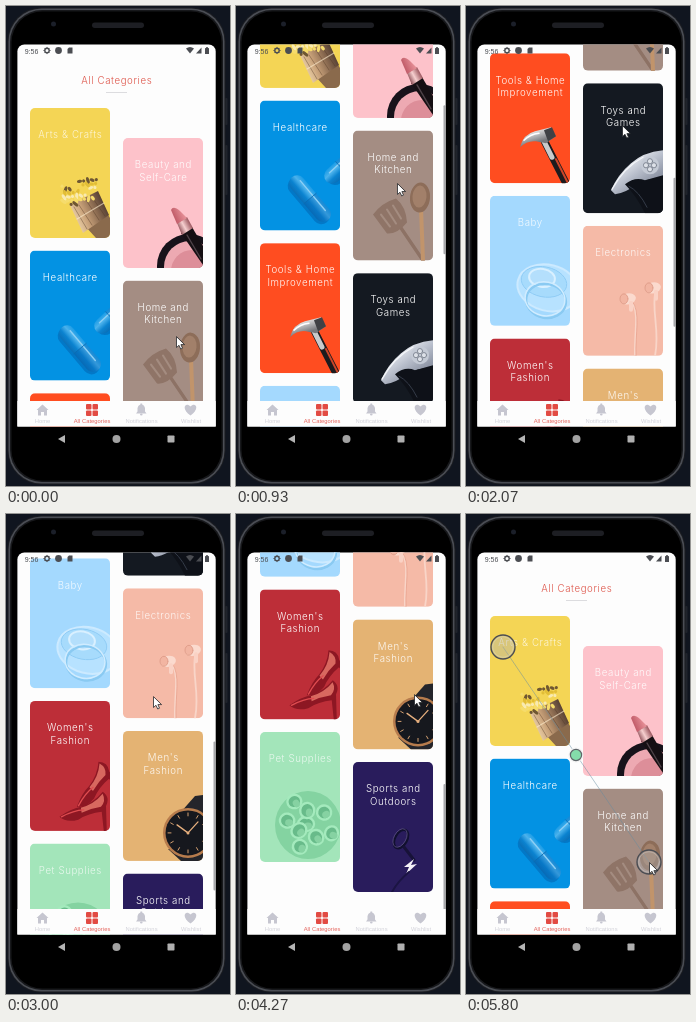
Recreate the animation shown at these times as an HTML page with a canvas. Size 224x480 px, loop 5870 ms.

```html
<!DOCTYPE html>
<html lang="en">
<head>
<meta charset="utf-8">
<title>Categories</title>
<style>
html, body { margin: 0; width: 100%; height: 100%; overflow: hidden; background: #10151d; }
canvas { display: block; width: 224px; height: 480px; }
</style>
</head>
<body>
<canvas id="stage"></canvas>
<script>
const W = 224, H = 480, LOOP = 5870, STEP = 200 / 3;
const PLAIN = '"Liberation Sans", Arial, sans-serif';
const LIGHT = 'Inter, "Liberation Sans", sans-serif';
const canvas = document.getElementById('stage');
const ctx = canvas.getContext('2d');
const dpr = window.devicePixelRatio || 1;
canvas.width = W * dpr;
canvas.height = H * dpr;

// Time, value
const scrollKeys = [
  [0, 0], [200, 0], [933, 150], [1100, 180], [1450, 192], [2067, 340], [2200, 360],
  [2500, 372], [3000, 485.5], [3150, 512], [3450, 532], [3750, 588], [3930, 597],
  [4267, 597], [4667, 339], [5000, 90], [5270, 0], [LOOP, 0]
];
// Time, x, y
const pointerKeys = [
  [0, 171, 331], [200, 171, 329], [933, 162, 178], [1090, 161, 150], [1480, 163, 275],
  [2067, 157, 120], [2480, 155, 300], [3000, 148, 183], [3150, 149, 155], [3470, 160, 235],
  [3850, 172, 160], [4267, 179, 181], [4667, 177, 266], [5270, 184, 349], [LOOP, 184, 349]
];

// Smooth interpolation that never overshoots a key
function sample(keys, t, col) {
  let i = 0;
  while (i < keys.length - 2 && t >= keys[i + 1][0]) i++;
  const slope = k => k < 0 || k > keys.length - 2 ? 0 :
    (keys[k + 1][col] - keys[k][col]) / (keys[k + 1][0] - keys[k][0]);
  const tangent = k => {
    const a = slope(k - 1), b = slope(k);
    return a * b > 0 ? 2 * a * b / (a + b) : 0;
  };
  const a = keys[i], b = keys[i + 1], d = b[0] - a[0];
  const u = Math.min(1, (t - a[0]) / d), v = 1 - u;
  return a[col] * (1 + 2 * u) * v * v + b[col] * u * u * (3 - 2 * u) +
    d * (tangent(i) * u * v * v - tangent(i + 1) * u * u * v);
}

function fill(d, color) {
  ctx.fillStyle = color;
  ctx.fill(new Path2D(d));
}

function line(d, color, width = 1) {
  ctx.strokeStyle = color;
  ctx.lineWidth = width;
  ctx.lineCap = 'round';
  ctx.stroke(new Path2D(d));
}

function oval(x, y, rx, ry, color, edge, width = 1, turn = 0) {
  ctx.beginPath();
  ctx.ellipse(x, y, rx, ry, turn, 0, Math.PI * 2);
  if (color) { ctx.fillStyle = color; ctx.fill(); }
  if (edge) { ctx.strokeStyle = edge; ctx.lineWidth = width; ctx.stroke(); }
}

function box(x, y, w, h, r, color) {
  ctx.beginPath();
  ctx.roundRect(x, y, w, h, r);
  ctx.fillStyle = color;
  ctx.fill();
}

function blend(x1, y1, x2, y2, ...colors) {
  const g = ctx.createLinearGradient(x1, y1, x2, y2);
  colors.forEach((c, i) => g.addColorStop(i / (colors.length - 1), c));
  return g;
}

function label(text, x, y, font, size, color, gap = 0) {
  ctx.font = font;
  ctx.letterSpacing = gap + 'px';
  ctx.textAlign = 'center';
  ctx.textBaseline = 'alphabetic';
  ctx.fillStyle = color;
  ctx.fillText(text, x + gap / 2, y + size * 0.36);
}

const heading = (text, x, y, color) => label(text, x, y, `300 9.7px ${LIGHT}`, 9.7, color, 0.6);
const caption = (text, x, y, size, color) => label(text, x, y, `${size}px ${PLAIN}`, size, color, 0.04);

function capsule(x, y, length, turn) {
  const half = length / 2;
  ctx.save();
  ctx.translate(x, y);
  ctx.rotate(turn);
  box(-half + 1, -6, length, 17, 8.5, 'rgba(0,90,165,.45)');
  box(-half, -8, length, 16, 8, blend(0, -8, 0, 8, '#1b9ce6', '#4bb2ec', '#0b83d0', '#0a70b8'));
  box(0, -8, half, 16, [0, 8, 8, 0], 'rgba(0,95,175,.3)');
  line(`M${8 - half} -4H${half - 9}`, '#8dcff5', 1.4);
  line('M0 -8V8', '#0b6cb2', 0.8);
  ctx.restore();
}

function brush() {
  fill('M55 118L77 105L80 110V130H66Z', '#8a6a4c');
  fill('M40 97L68 83L79 107L53 125Z', blend(42, 110, 76, 94, '#efd6ad', '#c9a27a', '#8a6a50', '#4b372d'));
  line('M44 99L57 121M49 97L62 117M56 92L69 112M62 89L75 108', 'rgba(80,55,38,.45)', 0.9);
  line('M47 111L74 95', 'rgba(255,238,208,.6)', 1.2);
  for (let i = 0; i < 34; i++) {
    const x = 32 + (i * 7.7) % 35, y = 74 + (i * 5.3) % 22 - (x - 46) * 0.3;
    oval(x, y, 1.6 + i % 3, 1.6, ['#f6dc6c', '#6f5732', '#e2bd36', '#f9eab0'][i % 4], null, 1, i);
  }
}

function lipstick() {
  oval(66, 128, 32, 32, '#17121a');
  oval(67, 129, 26, 26, '#eda9b2');
  oval(69, 133, 21, 21, '#dd8e99');
  fill('M58 95L69 89L80 108V127Z', '#150f13');
  fill('M54 85L64 79L70 90L59 97Z', blend(56, 92, 67, 86, '#8b4d55', '#f6cfcf', '#a4636a'));
  fill('M48 72Q50 67 57 73L64 80L54 86Z', blend(49, 80, 60, 75, '#b9515f', '#e48d95'));
  line('M64 97L78 121', '#4d4147', 1.4);
}

function utensils() {
  line('M47 96L70 130', '#8d7265', 3.4);
  fill('M20 84Q29 72 43 68Q53 76 54 92Q44 104 34 103Z', '#8f7467');
  line('M28 84L37 96M34 79L43 93M40 75L48 88', '#a48c80', 2);
  line('M68 78L70 130', '#c1946b', 4);
  oval(67, 67, 10, 15, '#8d6d59', null, 1, 0.08);
  oval(66.5, 66, 7, 11, '#a2806a', null, 1, 0.08);
}

function hammer() {
  ctx.lineCap = 'butt';
  line('M55 89L76 130', '#1d1b1e', 7.5);
  line('M54 88L62 104', '#c9cacb', 5);
  line('M66 106L78 130', '#ce4528', 2);
  fill('M30 94Q33 81 45 78L61 74L66 83L56 90L46 88Q37 87 30 94Z', blend(40, 77, 44, 90, '#f6f3f1', '#b6b7b9', '#77797d'));
  fill('M54 77L62 74L66 83L58 88Z', '#3f4145');
  line('M34 87Q40 81 49 80', '#fff', 1.5);
}

function gamepad() {
  fill('M28 107Q35 91 48 80Q60 69 80 67V95Q66 94 54 101Q42 110 32 111Z', blend(40, 80, 58, 105, '#e6e9ef', '#b9bfcc', '#8f96a6'));
  fill('M42 101Q52 93 62 97L80 92V130H62Q53 112 42 101Z', '#0e1118');
  line('M29 106Q41 84 60 74', '#f4f6f9', 1.3);
  line('M46 103Q56 108 64 124', '#343b48', 1);
  oval(67, 82, 9, 9, '#c4cad5');
  for (const [x, y] of [[63, 82], [71, 82], [67, 78], [67, 86]]) oval(x, y, 2.6, 2.6, '#dde1e8', '#6f7684', 0.8);
}

function pacifier() {
  oval(58, 92, 31, 23, 'rgba(210,238,255,.4)', '#cceaff', 2, 0.25);
  oval(54, 86, 23, 15, 'rgba(120,193,241,.25)', '#8fccf5', 1, 0.2);
  oval(52, 82, 13, 9, '#b4dffc', '#d9f0ff', 2, 0.15);
  oval(56, 105, 20, 17, null, '#8acaf2', 2.4, 0.2);
  oval(55, 103, 20, 17, null, '#d0ecff', 1.5, 0.2);
}

function earbuds() {
  line('M48 75C57 86 51 108 52 130M72 68C69 88 77 106 72 130', '#f9d5c8', 1.8);
  line('M49 75C58 86 52 108 53 130', '#e29881', 0.6);
  for (const [x, y] of [[45, 73], [70, 62]]) {
    oval(x, y, 8, 5.5, '#fbdace', null, 1, -0.2);
    oval(x - 4, y, 4, 5, '#f2b5a2', '#d99480', 0.7);
    box(x + 1, y + 2, 4, 11, 2, '#fad2c5');
  }
}

function shoe(x, y, turn) {
  ctx.save();
  ctx.translate(x, y);
  ctx.rotate(turn);
  fill('M-24 12Q-12 3 -3 1Q10-4 18-15Q26-10 22-1L24 24L21 24L18 5Q5 7-5 14Q-17 18-24 12Z', '#8d1723');
  fill('M-3 2Q10-2 18-13Q22-6 17 0Q7 2-2 7Z', '#d8685f');
  line('M-22 12Q-10 5 0 4', '#df4c50', 1.4);
  ctx.restore();
}

function heels() {
  shoe(61, 83, -0.55);
  shoe(54, 105, 0.05);
}

function watch() {
  fill('M57 82L72 65L80 64V96Z', '#24252b');
  fill('M45 118L58 130H80V116Z', '#24252b');
  oval(65, 102, 25, 25, '#b77c4d');
  oval(65, 102, 22.5, 22.5, '#16181e');
  for (let i = 0; i < 12; i++) {
    const c = Math.cos(i * Math.PI / 6), s = Math.sin(i * Math.PI / 6);
    line(`M${65 + c * 17} ${102 + s * 17}L${65 + c * 20} ${102 + s * 20}`, '#d4a071', 1);
  }
  line('M65 102L54 94M65 102L75 91', '#e5ae7d', 1.3);
  oval(65, 102, 1.5, 1.5, '#e5ae7d');
}

function ball() {
  oval(48, 93, 33, 34, '#84d3a1');
  for (let i = 0; i < 9; i++) {
    const a = i * 2.4, r = Math.sqrt(i) * 9.6;
    const x = 46 + Math.cos(a) * r, y = 92 + Math.sin(a) * r;
    oval(x, y, 8 - i * 0.2, 7, '#68bb8a', '#a4eabd', 2.4, a);
    oval(x + 2, y + 2, 4, 3.4, '#86d2a2', null, 1, a);
  }
}

function sport() {
  oval(48, 77, 6, 10, null, '#11102f', 2.5, 0.5);
  oval(47, 76, 6, 10, null, '#66598d', 0.7, 0.5);
  line('M51 85L61 98', '#171238', 3);
  fill('M61 97L51 105L56 105L53 112L64 102L58 103Z', '#f4f1f7');
  line('M56 110Q45 119 39 130', '#1b1443', 2);
}

function capsules() {
  capsule(81, 67, 40, -0.75);
  capsule(50, 98, 56, 0.87);
}

const columns = [
  { x: 24, y: 102, cards: [
    ['#f4d555', 'Arts & Crafts', brush, 0.75],
    ['#0392e3', 'Healthcare', capsules, 1],
    ['#ff4d20', 'Tools & Home|Improvement', hammer, 0.95],
    ['#a4d9fe', 'Baby', pacifier, 0.85],
    ['#bd2e38', "Women's|Fashion", heels, 1],
    ['#a3e5ba', 'Pet Supplies', ball, 0.75]
  ] },
  { x: 117, y: 132, cards: [
    ['#fdc2ca', 'Beauty and|Self-Care', lipstick, 0.9],
    ['#a48d83', 'Home and|Kitchen', utensils, 1],
    ['#141921', 'Toys and|Games', gamepad, 1],
    ['#f5baa7', 'Electronics', earbuds, 0.85],
    ['#e4b373', "Men's|Fashion", watch, 0.9],
    ['#291c5c', 'Sports and|Outdoors', sport, 1]
  ] }
];

function drawCard(x, y, [color, text, art, alpha]) {
  ctx.save();
  ctx.translate(x, y);
  ctx.beginPath();
  ctx.roundRect(0, 0, 80, 130, 5);
  ctx.clip();
  ctx.fillStyle = color;
  ctx.fillRect(0, 0, 80, 130);
  art();
  text.split('|').forEach((s, i) => heading(s, 40, 26.8 + i * 12.5, `rgba(255,255,255,${alpha})`));
  ctx.restore();
}

function drawPhone() {
  ctx.fillStyle = '#10151f';
  ctx.fillRect(0, 0, W, H);
  box(219, 92, 2.5, 27, 1, '#20242c');
  box(219, 139, 2.5, 50, 1, '#20242c');
  box(1.5, 1.5, 218, 477, 34, '#1a1c21');
  box(2.5, 2.5, 216, 475, 33, '#4a4d54');
  box(4, 4, 213, 472, 32, '#17181b');
  box(5.5, 5.5, 210, 469, 31, '#000');
  box(86, 16.5, 52, 5.5, 2.8, '#1d1e23');
  oval(47.5, 18, 2.5, 2.5, '#1b1f29');
  fill('M59 429V437L52 433Z', '#b4b4b4');
  oval(110.5, 433, 4, 4, '#a2a2a2');
  box(161.5, 429.5, 7, 7, 0.8, '#b0b0b0');
}

function drawStatus() {
  const ink = '#4b4d52';
  caption('9:56', 25.5, 45, 7, ink);
  oval(41, 44.5, 2.2, 2.2, null, ink, 1.4);
  for (let i = 0; i < 8; i++) {
    const c = Math.cos(i * Math.PI / 4), s = Math.sin(i * Math.PI / 4);
    line(`M${41 + c * 2.6} ${44.5 + s * 2.6}L${41 + c * 3.2} ${44.5 + s * 3.2}`, ink, 0.9);
  }
  oval(52.5, 44.5, 3.4, 3.4, ink);
  fill('M63 41.500H66.500V47.500H61.500V43Z', ink);
  fill('M180 42.500Q184 39.500 188 42.500L184 47.500Z', ink);
  fill('M190 47.500L195.500 41.500V47.500Z', ink);
  box(199, 42, 4, 6, 0.6, ink);
  box(200.2, 41, 1.6, 1, 0, ink);
}

function drawTabs() {
  const grey = '#c6c6d0', red = '#e24b43';
  ctx.fillStyle = '#fdfdfd';
  ctx.fillRect(11, 395, 199, 26);
  fill('M30.500 404L36.500 398.500L42.500 404H41V409.500H38V406H35V409.500H32V404Z', grey);
  for (const x of [80, 86.5]) for (const y of [398, 404.5]) box(x, y, 5.5, 5.5, 1, red);
  fill('M130 407.500L131.500 405.500V402Q132 399 134.400 398.500V397.500H136.200V398.500Q138.500 399 139 402V405.500L140.500 407.500Z', grey);
  oval(135.3, 408.5, 1.3, 1, grey);
  fill('M184.500 409.500C174 402 180 395.500 184.500 400.500C189 395.500 195 402 184.500 409.500Z', grey);
  const tabs = [['Home', 36.5], ['All Categories', 86], ['Notifications', 135.5], ['Wishlist', 185]];
  for (const [s, x] of tabs) caption(s, x, 415, 5.8, x === 86 ? '#e5645d' : '#d2d2da');
}

function drawScreen(t) {
  const scroll = sample(scrollKeys, t, 1);
  ctx.save();
  ctx.beginPath();
  ctx.roundRect(11.4, 38.4, 198.3, 382.2, [7, 7, 0, 0]);
  ctx.clip();
  ctx.fillStyle = '#fdfdfd';
  ctx.fillRect(11, 38, 199, 383);
  heading('All Categories', 110.5, 75 - scroll, '#de564b');
  ctx.fillStyle = '#dcdcdf';
  ctx.fillRect(100, 86 - scroll, 21, 1);
  for (const { x, y, cards } of columns) {
    cards.forEach((card, i) => {
      const top = y + i * 142.6 - scroll;
      if (top > -100 && top < 396) drawCard(x, top, card);
    });
  }
  const fadeIn = Math.min(1, Math.max(0, (t - 200) / 100));
  const fadeOut = Math.min(1, Math.max(0, (5480 - t) / 200));
  const shown = fadeIn * fadeOut;
  if (shown) box(207.5, 42 + scroll * 0.382, 2, 149, 1, `rgba(110,112,118,${0.6 * shown})`);
  drawStatus();
  drawTabs();
  ctx.restore();
}

function drawPinch() {
  line('M37 133L183 348', 'rgba(100,140,160,.7)', 0.7);
  for (const [x, y] of [[37, 133], [183, 348]]) {
    oval(x, y, 12, 12, 'rgba(175,175,178,.4)', '#4b4d53', 1.4);
    oval(x, y, 10.3, 10.3, null, 'rgba(225,225,225,.4)', 0.8);
  }
  oval(110, 241, 7.5, 7.5, 'rgba(240,240,240,.8)');
  oval(110, 241, 5.6, 5.6, '#84dcaa', '#5f666a', 1.2);
}

function drawPointer(t) {
  ctx.save();
  ctx.translate(sample(pointerKeys, t, 1) - 0.5, sample(pointerKeys, t, 2));
  const arrow = 'M0 0V10.500L2.500 8.300L4.200 12L6 11.200L4.400 7.600H7.700Z';
  fill(arrow, '#fff');
  line(arrow, '#25272b', 0.8);
  ctx.restore();
}

function draw(now) {
  const t = Math.floor((now % LOOP + 4) / STEP) * STEP;
  ctx.setTransform(dpr, 0, 0, dpr, 0, 0);
  drawPhone();
  drawScreen(t);
  if (t >= 5660) drawPinch();
  drawPointer(t);
}

let start;
function tick(now) {
  start ??= now;
  draw(Math.max(0, now - start));
  requestAnimationFrame(tick);
}
draw(0);
requestAnimationFrame(tick);
</script>
</body>
</html>
```
